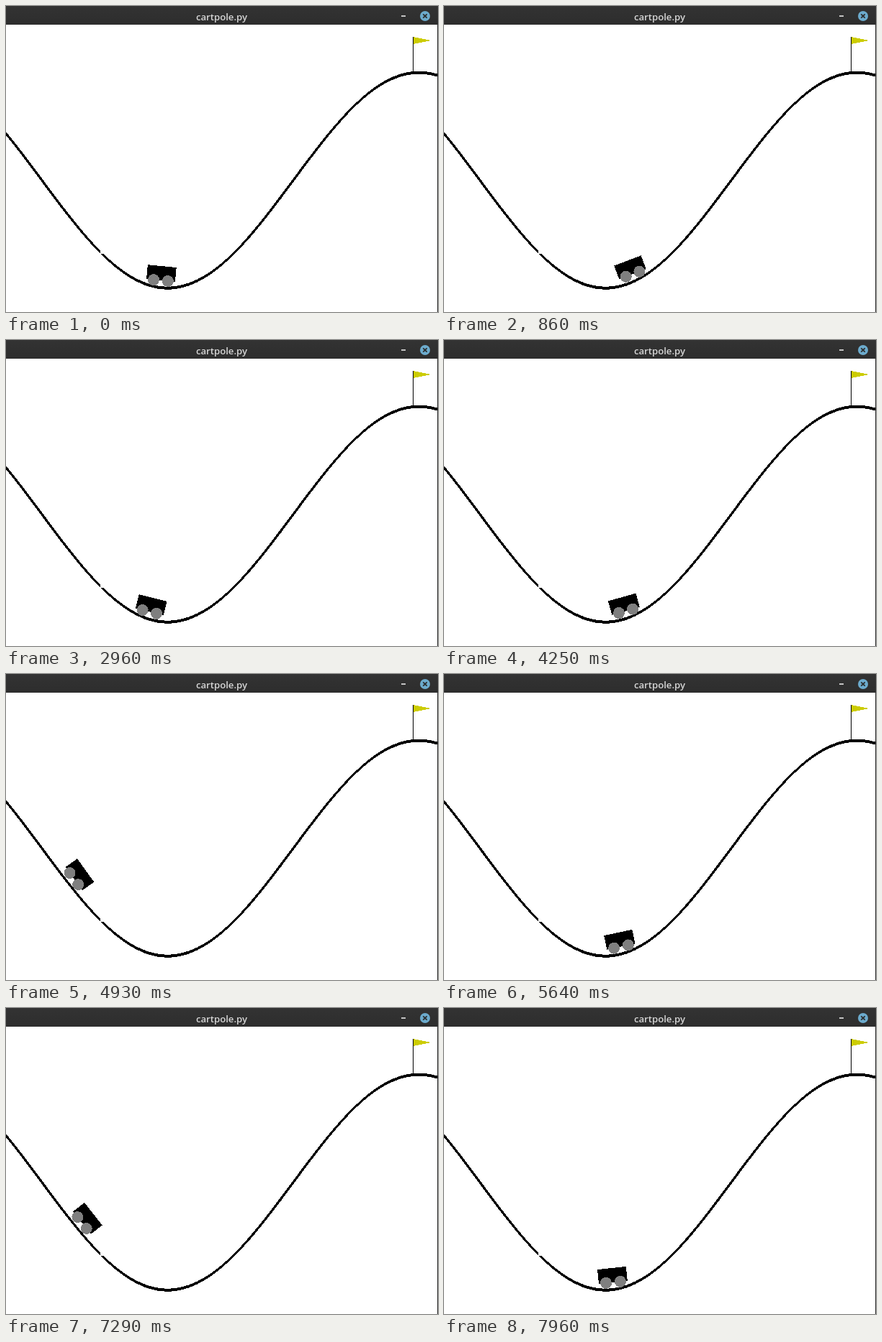
Recreate the animation shown at these times as an HTML page. Size 600 by 426 pixels, loop 8000 ms.

```html
<!DOCTYPE html>
<html lang="en">
<head>
<meta charset="utf-8">
<title>cartpole.py</title>
<style>
  html, body { margin: 0; width: 100%; height: 100%; overflow: hidden; background: #fff; }
  svg { position: absolute; left: 0; top: 0; }
  .title { font: 600 13.2px "Open Sans", "Noto Sans", sans-serif; fill: #d6d6d6; text-anchor: middle; }
</style>
</head>
<body>
<svg width="600" height="426" viewBox="0 0 600 426">
  <defs>
    <linearGradient id="shade" x2="0" y2="1">
      <stop stop-color="#333"/><stop offset="1" stop-color="#2d2d2d"/>
    </linearGradient>
  </defs>
  <g shape-rendering="crispEdges">
    <path id="track"/>
    <g id="car">
      <path d="M-20 -10v-20h40v20z"/>
      <circle cx="10" cy="-10" r="8" fill="#7f7f7f"/>
      <circle cx="-10" cy="-10" r="8" fill="#7f7f7f"/>
    </g>
    <path d="M565 43h1v50h-1z"/>
    <path d="M565.7 43v10l25 -5z" fill="#cc0"/>
    <path d="M599 26h1v400h-1z" fill="#2f2f2f"/>
  </g>
  <rect width="600" height="26" fill="url(#shade)"/>
  <text class="title" x="299.5" y="20">cartpole.py</text>
  <path d="M549 14h6" stroke="#c4c4c4" stroke-width="2"/>
  <circle cx="582" cy="14" r="7" fill="#6cabcd"/>
  <path d="M579.3 11.3l5.4 5.4m0 -5.4l-5.4 5.4" stroke="#2b2b2b" stroke-width="1.7"/>
</svg>
<script>
const LOOP = 8000, SCALE = 1000 / 3, FLOOR = 426, LEFT = -1;
const byId = id => document.getElementById(id);

// The hill is a sine; world x runs from -1.2 to 0.6
const toX = x => (x + 1.2) * SCALE + LEFT;
const toWorld = px => (px - LEFT) / SCALE - 1.2;
const toY = x => FLOOR - (Math.sin(3 * x) * .45 + .55) * SCALE;

// Three attempts: turning points and a few places passed, as [ms, px]
const runs = [
  [[0, 214], [400, 150], [510, 171], [850, 262], [1200, 360], [1450, 254],
   [1660, 65.4], [1950, 9], [2290, 152], [2435, 299], [2760, 556]],
  [[2775, 209], [2960, 197], [3340, 146], [3665, 262], [3975, 362], [4250, 256],
   [4460, 99], [4735, 33], [4950, 99], [5100, 225], [5590, 585]],
  [[5610, 249], [6140, 152], [6350, 225], [6590, 327], [6850, 363],
   [7085, 254], [7290, 98.3], [7560, 17], [7790, 99], [7960, 236]]
];
// The picture stalls twice
const stalls = [[510, 660], [6590, 6770]];

const slope = (a, b) => (b[1] - a[1]) / (b[0] - a[0]);

// Speed at a key: none at the start and where the cart turns
function speed(run, i) {
  if (i === 0) return 0;
  const before = slope(run[i - 1], run[i]);
  if (i === run.length - 1) return before;
  const after = slope(run[i], run[i + 1]);
  if (before * after <= 0) return 0;
  const h0 = run[i][0] - run[i - 1][0], h1 = run[i + 1][0] - run[i][0];
  const mean = (before * h1 + after * h0) / (h0 + h1);
  const limit = 3 * Math.min(Math.abs(before), Math.abs(after));
  return Math.sign(mean) * Math.min(1.15 * Math.abs(mean), limit);
}

function position(t) {
  const run = runs.filter(r => r[0][0] <= t).pop();
  const i = run.findIndex(key => key[0] > t);
  if (i < 0) return run[run.length - 1][1];
  const [t0, p0] = run[i - 1], [t1, p1] = run[i];
  const d = t1 - t0, u = (t - t0) / d, w = 1 - u;
  return w * w * ((1 + 2 * u) * p0 + u * d * speed(run, i - 1))
       + u * u * ((3 - 2 * u) * p1 - w * d * speed(run, i));
}

// The pen is 4 px tall on shallow slopes and 4 px wide on steep ones
function trackPath(parts) {
  let d = '';
  for (let i = 0; i < parts; i++) {
    const a = -1.2 + 1.8 * i / parts, b = a + 1.8 / parts;
    const k = (toY(b) - toY(a)) / (toX(b) - toX(a));
    const x0 = toX(a) - 1, y0 = toY(a) - k, x1 = toX(b) + 1, y1 = toY(b) + k;
    const [dx, dy] = Math.abs(k) > 1 ? [2, 0] : [0, 2];
    d += `M${x0 - dx} ${y0 - dy}L${x1 - dx} ${y1 - dy}L${x1 + dx} ${y1 + dy}L${x0 + dx} ${y0 + dy}z`;
  }
  return d;
}

function draw(t) {
  const stall = stalls.find(([from, to]) => t >= from && t < to);
  const px = position(stall ? stall[0] : t), x = toWorld(px);
  const angle = -Math.cos(3 * x) * 180 / Math.PI;
  byId('car').setAttribute('transform', `translate(${px} ${toY(x)}) rotate(${angle})`);
}

byId('track').setAttribute('d', trackPath(99));
const start = performance.now();
function tick() {
  draw((performance.now() - start) % LOOP);
  requestAnimationFrame(tick);
}
tick();
</script>
</body>
</html>
```
